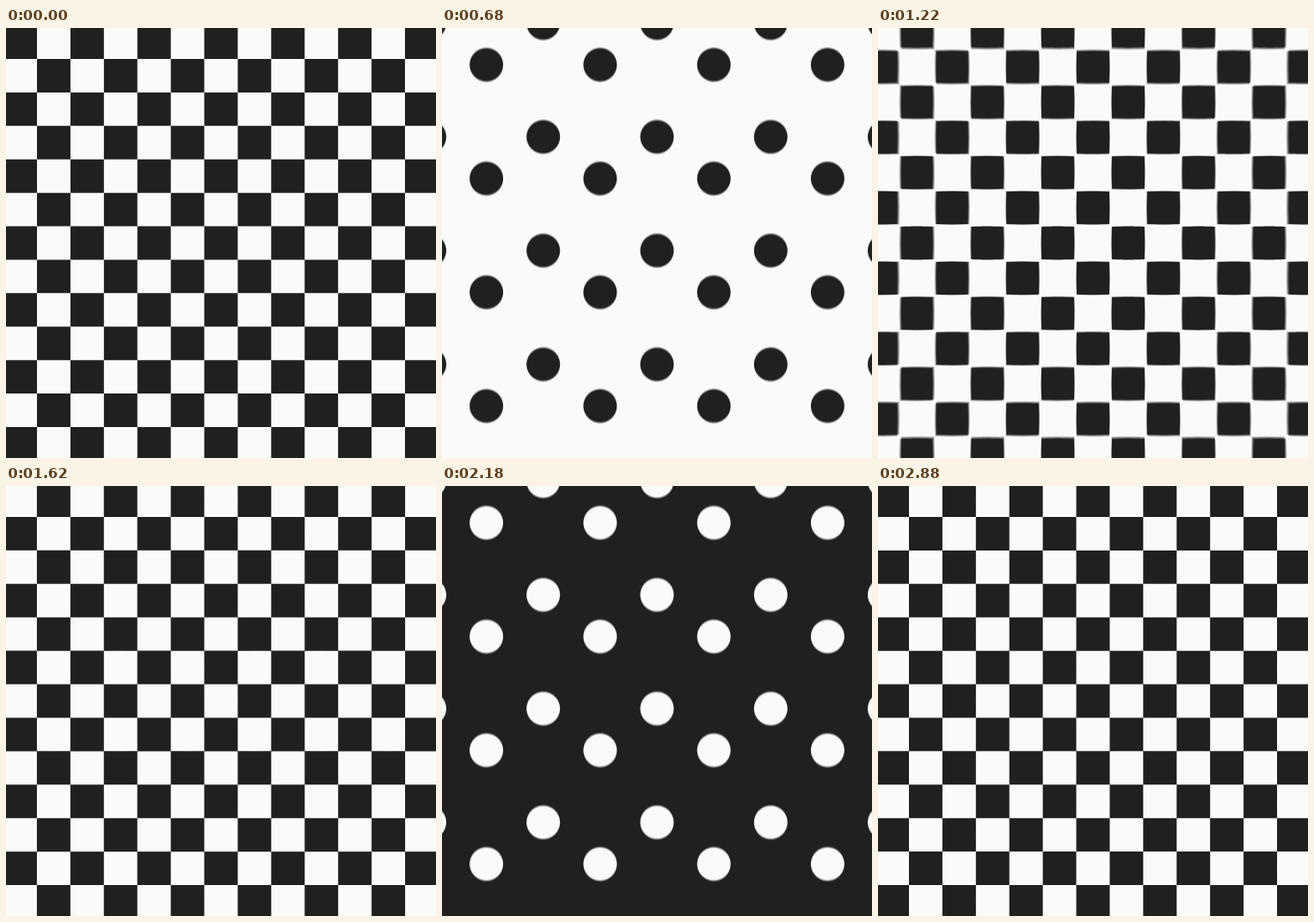
Write an HTML page with a canvas that moves like this. It is 500 px wide and 500 px high and loops after 3000 ms.

```html
<!DOCTYPE html>
<html lang="en">
<head>
<meta charset="utf-8">
<title>Checkers and dots</title>
<style>
  html, body { margin: 0; width: 100%; height: 100%; overflow: hidden; background: #fafafa; }
  canvas { display: block; width: 500px; height: 500px; }
</style>
</head>
<body>
<canvas id="stage" width="500" height="500"></canvas>
<script>
const SIZE = 500, CELL = 38.9, SPREAD = 0.7;
const LOOP = 3000, HALF = LOOP / 2, STEP = 20;
const SAMPLES = 8, SHUTTER = 14;
const DARK = '#202020', LIGHT = '#fafafa';

const stage = document.getElementById('stage').getContext('2d');
const layer = document.createElement('canvas');
layer.width = layer.height = SIZE;
const pen = layer.getContext('2d');

const clamp = x => Math.min(1, Math.max(0, x));

function ease(p, power) {
  p = clamp(p);
  return p < 0.5 ? 0.5 * (2 * p) ** power : 1 - 0.5 * (2 - 2 * p) ** power;
}

// Outline between a square (round = 0) and its inscribed circle (round = 1).
function tilePath(round) {
  const path = new Path2D(), points = 96;
  for (let k = 0; k < points; k++) {
    const a = k / points * 2 * Math.PI, c = Math.cos(a), s = Math.sin(a);
    const square = 1 / Math.max(Math.abs(c), Math.abs(s));
    const r = CELL / 2 * (square + (1 - square) * round);
    path.lineTo(r * c, r * s);
  }
  path.closePath();
  return path;
}

function drawInstant(ms) {
  const inverted = ms % LOOP >= HALF;
  const t = ms % HALF;
  const open = ease(1 - Math.abs(2 * t / HALF - 1), 6);
  const slide = ease((t - HALF / 4) / (HALF / 2), 7.2);
  const gap = CELL * (1 + SPREAD * open);
  const tile = tilePath(open);

  pen.setTransform(1, 0, 0, 1, 0, 0);
  pen.fillStyle = inverted ? DARK : LIGHT;
  pen.fillRect(0, 0, SIZE, SIZE);
  pen.fillStyle = inverted ? LIGHT : DARK;
  for (let i = -7; i <= 7; i++) {
    const shift = i % 2 ? -slide : slide;
    for (let j = -9; j <= 9; j++) {
      if ((i + j) % 2) continue;
      pen.setTransform(1, 0, 0, 1, SIZE / 2 + i * gap, SIZE / 2 + (j + shift) * gap);
      pen.fill(tile);
    }
  }
}

// Motion blur: a running average of several instants.
function render(ms) {
  for (let k = 0; k < SAMPLES; k++) {
    drawInstant(ms + (k + 0.5) / SAMPLES * SHUTTER);
    stage.globalAlpha = 1 / (k + 1);
    stage.drawImage(layer, 0, 0);
  }
}

const start = performance.now();
let shown = -1;

function tick(now) {
  const elapsed = Math.max(0, now - start) % LOOP;
  const time = Math.floor((elapsed + 1) / STEP) * STEP % LOOP;
  if (time !== shown) render(shown = time);
  requestAnimationFrame(tick);
}
tick(start);
</script>
</body>
</html>
```
